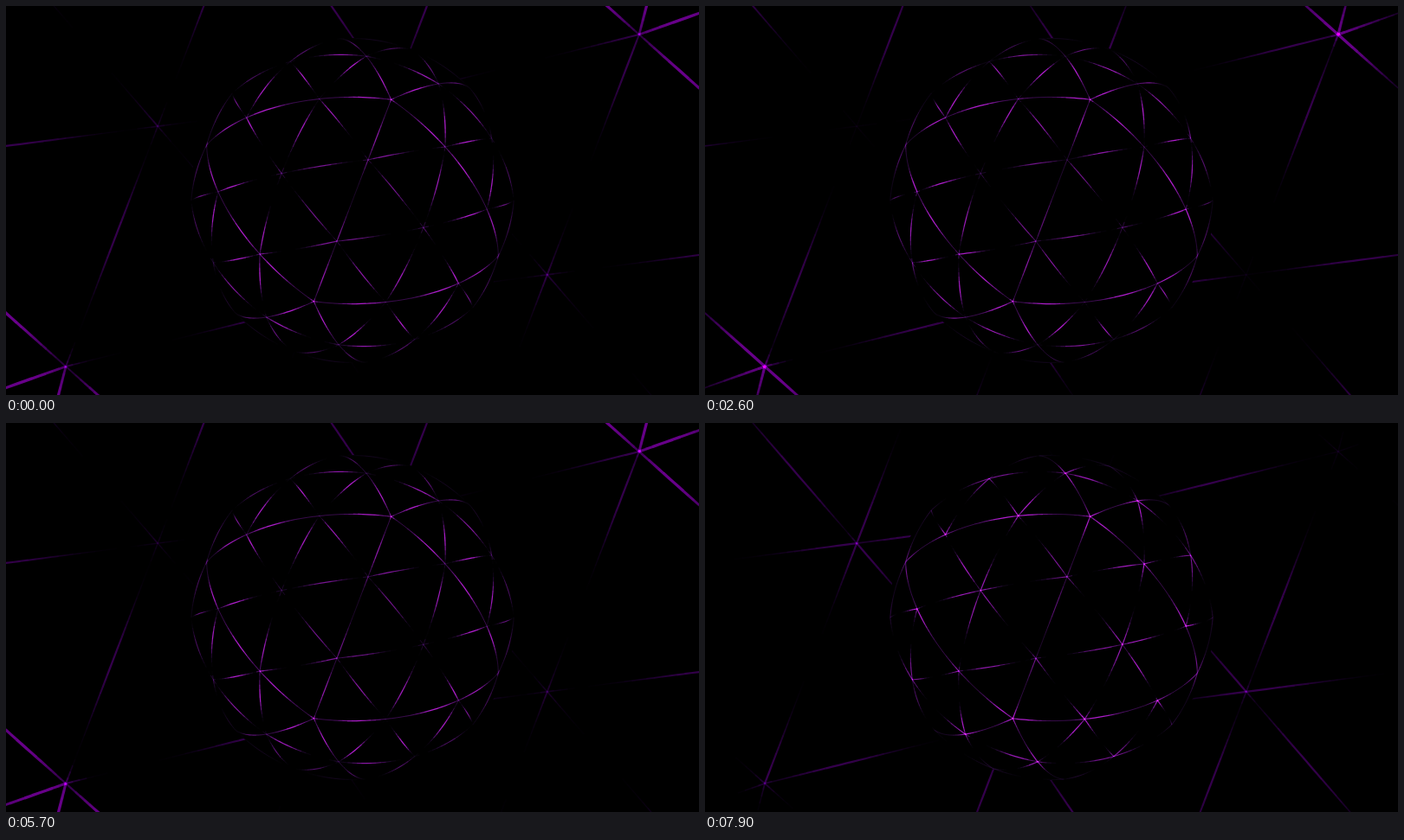
These frames come from a looping animation (800 px wide and 450 px high, 8 s). An HTML page with a canvas:

```html
<!DOCTYPE html>
<html>
<head>
<meta charset="utf-8">
<style>
html, body { margin: 0; width: 100%; height: 100%; overflow: hidden; background: #000; }
canvas { display: block; }
</style>
</head>
<body>
<canvas id="stage" width="800" height="450"></canvas>
<script>
const ctx = document.getElementById('stage').getContext('2d');
const LOOP = 8000, STEP = 100, PERIOD = 10100 / 7;
const FOCAL = 630, CAMERA = 3.5, RADIUS = 188, TILT = Math.atan(0.38197);
const COS = Math.cos(TILT), SIN = Math.sin(TILT);

// Corners of an icosahedron; an upper-case name is the lower-case node turned by 180 degrees.
const S = 0.5257, L = 0.8507;
const corners = { c: [0, S, L], h: [-L, 0, S], q: [S, L, 0], p: [-S, L, 0] };
const flip = s => [...s].map(k => k < 'a' ? k.toLowerCase() : k.toUpperCase()).join('');
for (const name of Object.keys(corners)) {
  const [x, y, z] = corners[name];
  corners[flip(name)] = [-x, -y, z];
}

// Each node of the subdivided faces is the sum of three corners.
const sums = {
  a: 'ccC', b: 'cCH', c: 'ccc', d: 'ccH', e: 'cHH', f: 'cch', g: 'chh', h: 'hhh', i: 'ccp',
  j: 'ccq', k: 'cHq', l: 'chp', m: 'hhp', n: 'HHq', o: 'cqp', r: 'qqc', s: 'ppc'
};
const nodes = {};
for (const name of Object.keys(sums)) {
  const mirror = flip(name);
  sums[mirror] = flip(sums[name]);
  for (const n of [name, mirror])
    nodes[n] = [0, 1, 2].map(axis => [...sums[n]].reduce((t, k) => t + corners[k][axis], 0));
}

// Edge "xy" carries a pulse from node x to node y; the value is its place at time 0.
const middle = {
  ca: 0.7, aA: 0.9, AC: 0.5,
  ab: 0.45, af: 0.72, da: 0.8, aB: 0.55,
  AB: 0.4, AF: 0.5, AD: 0.1, bA: 0.78,
  eb: 0.35, bF: 0.62, db: 0.5, bG: 0.85,
  BE: 0.72, fB: 0.45, BD: 0.75, Bg: 0.85,
  cf: 0.4, CF: 0.7
};
const outer = {
  cd: 0.75, ed: 0.65, eH: 0.3, jd: 0.7, kd: 0.6, cj: 0.5, ic: 0.6, fg: 0.7, gh: 0.4, fi: 0.7,
  ij: 0.8, li: 0.65, io: 0.6, oj: 0.6, si: 0.5, jr: 0.5, jk: 0.6, ke: 0.65, kn: 0.6, ne: 0.5,
  lf: 0.5, gl: 0.45, gm: 0.5, lm: 0.6, sl: 0.75, hm: 0.6, hN: 0.6, rk: 0.2, so: 0.5, or: 0.6, Hn: 0.5
};
const backdrop = {
  DB: 0.55, EB: 0.5, Bf: 0.6, Bg: 0.85, Ba: 0.75, AB: 0.5,
  ad: 0.05, DA: 0.8, bd: 0.88, be: 0.6, bG: 0.85, bF: 0.9, ba: 0.55, bA: 0.5,
  af: 0.45, ac: 0.4, AC: 0.85, FA: 0.05
};
const rays = { dc: 0.22, dj: 0.15, dk: 0.15, de: 0.22, DC: 0.27, DJ: 0.15, DK: 0.15, DE: 0.27 };

// Edges between two corners are seams: they never go fully dark.
const isSeam = key => new Set(sums[key[0]] + sums[key[1]]).size < 3;
const toEdges = (table, strength = 1) => Object.entries(table).map(([key, phase]) =>
  ({ from: key[0], to: key[1], phase, strength, floor: isSeam(key) ? 0.35 : 0 }));
const mirrored = Object.fromEntries(Object.entries(outer).map(([key, phase]) => [flip(key), phase]));

function place(x, y, scale) {
  const px = scale * (x * COS + y * SIN), py = scale * (x * SIN - y * COS);
  return { x: 400 + px, y: 225 + py, r: Math.hypot(px, py) };
}
function onBall([x, y, z]) {
  const n = Math.hypot(x, y, z);
  return z / n < 1 / CAMERA ? null : place(x / n, y / n, FOCAL / (CAMERA - z / n));
}
const onSky = ([x, y, z]) => place(x, y, FOCAL / z);

// The net on the ball brightens outward, then fades where it turns away at the rim.
function ballGain(r) {
  const facing = Math.sqrt(Math.max(0, 1 - (r / RADIUS) ** 2));
  return (0.42 + 0.4 * Math.min(1, r / 125)) * Math.min(1, 1.9 * facing);
}

const ball = {
  edges: toEdges({ ...middle, ...outer, ...mirrored }),
  project: onBall, parts: 16, gain: ballGain, bright: 'cChH',
  rgb: [225, 35, 255], width: b => 0.85 + 0.5 * b
};
const sky = {
  edges: [...toEdges(backdrop, 0.55), ...toEdges(rays)].map(e => ({ ...e, floor: 0 })),
  project: onSky, parts: 40, gain: () => 0.95, bright: '',
  rgb: [110, 0, 145], width: b => 1 + 2.4 * b
};

const glow = (u, phase) => (0.5 + 0.5 * Math.cos(2 * Math.PI * (u - phase))) ** 1.6;

function drawNet({ edges, project, parts, gain, bright, rgb, width }, shift) {
  const flare = {};
  const raise = (name, v) => flare[name] = Math.max(flare[name] || 0, v);
  for (const e of edges) {
    raise(e.from, 0.7 * e.strength * glow(0, e.phase + shift));
    raise(e.to, 0.7 * e.strength * glow(1, e.phase + shift));
  }
  for (const name of bright) raise(name, 1);

  for (const e of edges) {
    const A = nodes[e.from], B = nodes[e.to];
    const at = u => project(A.map((v, k) => v + (B[k] - v) * u));
    let last = at(0);
    for (let s = 1; s <= parts; s++) {
      const next = at(s / parts), u = (s - 0.5) / parts;
      if (last && next) {
        const pulse = e.strength * (e.floor + (1 - e.floor) * glow(u, e.phase + shift));
        const light = Math.max(pulse, flare[e.from] * (1 - u / 0.1), flare[e.to] * (1 - (1 - u) / 0.1));
        const b = light * gain(last.r);
        if (b > 0.015) {
          ctx.strokeStyle = `rgb(${rgb[0] * b ** 1.15},${rgb[1] * b},${rgb[2] * b})`;
          ctx.lineWidth = width(b);
          ctx.beginPath();
          ctx.moveTo(last.x, last.y);
          ctx.lineTo(next.x, next.y);
          ctx.stroke();
        }
      }
      last = next;
    }
  }
}

function draw(time) {
  const shift = Math.floor(time % LOOP / STEP) * STEP / PERIOD;
  ctx.globalCompositeOperation = 'source-over';
  ctx.fillStyle = '#000';
  ctx.fillRect(0, 0, 800, 450);
  ctx.globalCompositeOperation = 'lighter';
  drawNet(sky, shift);
  // The ball hides the net behind it.
  ctx.globalCompositeOperation = 'source-over';
  ctx.beginPath();
  ctx.arc(400, 225, RADIUS, 0, 2 * Math.PI);
  ctx.fill();
  ctx.globalCompositeOperation = 'lighter';
  drawNet(ball, shift);
}

const start = performance.now();
function tick() {
  draw(performance.now() - start);
  requestAnimationFrame(tick);
}
tick();
</script>
</body>
</html>
```
